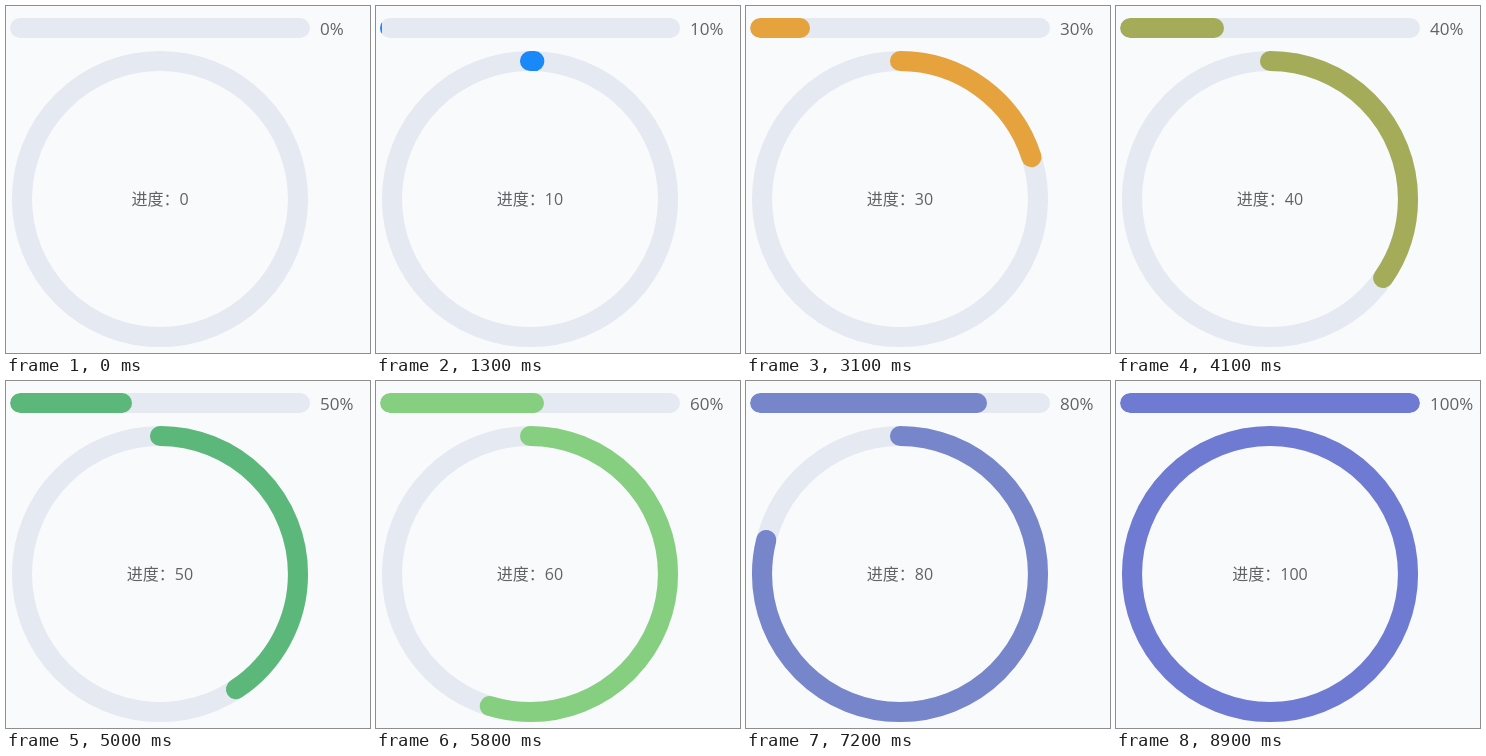
Write an HTML page that moves like this. It is 364 px wide and 347 px high and loops after 9800 ms.

```html
<!DOCTYPE html>
<html lang="zh-CN">
<head>
<meta charset="utf-8">
<title>进度</title>
<style>
  html, body { margin: 0; width: 100%; height: 100%; overflow: hidden; background: #f9fafc; }
  .track { position: absolute; left: 4px; top: 12px; width: 300px; height: 20px;
           border-radius: 100px; overflow: hidden; background: #e5e9f2; }
  .bar { height: 100%; border-radius: 100px; }
  svg { position: absolute; left: 0; top: 0; }
  circle { fill: none; stroke: #e5e9f2; stroke-width: 20.1; }
  text { font: 16px "Open Sans", "Noto Sans CJK SC", "Noto Sans CJK", sans-serif; fill: #606266; }
  #percent { font-size: 17px; }
</style>
</head>
<body>
<div class="track"><div class="bar" id="bar"></div></div>
<svg width="364" height="347">
  <circle cx="154" cy="193" r="138"/>
  <circle id="ring" cx="154" cy="193" r="138" stroke-linecap="round" transform="rotate(-90 154 193)"/>
  <text id="percent" x="314" y="29"></text>
  <text id="label" x="154" y="199" text-anchor="middle"></text>
</svg>
<script>
const LOOP = 9800, TICK = 100, DURATION = 600;
const CIRCUMFERENCE = 2 * Math.PI * 138;
const STARTS = [1260, 2168, 3090, 3933, 4950, 5633, 6152, 6832, 7690, 8335];
const BLUE = [25, 137, 250], ORANGE = [230, 162, 60], GREEN = [92, 184, 122],
      LIME = [184, 233, 134], VIOLET = [111, 122, 211];
const LEVELS = [BLUE, ORANGE, GREEN, LIME, VIOLET, VIOLET];

const [bar, ring, percent, label] =
  ['bar', 'ring', 'percent', 'label'].map(id => document.getElementById(id));

// CSS "ease": cubic-bezier(.25, .1, .25, 1)
function ease(x) {
  if (x >= 1) return 1;
  const bezier = (s, a, b) => 3 * (1 - s) ** 2 * s * a + 3 * (1 - s) * s * s * b + s ** 3;
  let low = 0, high = 1;
  for (let i = 0; i < 24; i++) {
    const mid = (low + high) / 2;
    if (bezier(mid, .25, .25) < x) low = mid; else high = mid;
  }
  return bezier(low, .1, 1);
}

const target = step => [step * 10, ...LEVELS[step >> 1]];

// Each transition starts from wherever the previous one had got to.
function stateAt(time, step) {
  if (!step) return target(0);
  const start = STARTS[step - 1];
  const from = stateAt(start, step - 1);
  const k = ease((time - start) / DURATION);
  return target(step).map((to, i) => from[i] + (to - from[i]) * k);
}

function draw(time) {
  const step = STARTS.filter(start => start <= time).length;
  const [value, ...rgb] = stateAt(time, step);
  const color = `rgb(${rgb.map(Math.round)})`;
  bar.style.width = value + '%';
  bar.style.background = color;
  ring.style.stroke = color;
  ring.style.opacity = step ? 1 : 0;
  ring.style.strokeDasharray = `${CIRCUMFERENCE * value / 100} ${CIRCUMFERENCE}`;
  percent.textContent = step * 10 + '%';
  label.textContent = '进度：' + step * 10;
}

const begin = performance.now();
function frame() {
  const time = (performance.now() - begin) % LOOP;
  draw(Math.floor(time / TICK) * TICK);
  requestAnimationFrame(frame);
}
frame();
</script>
</body>
</html>
```
